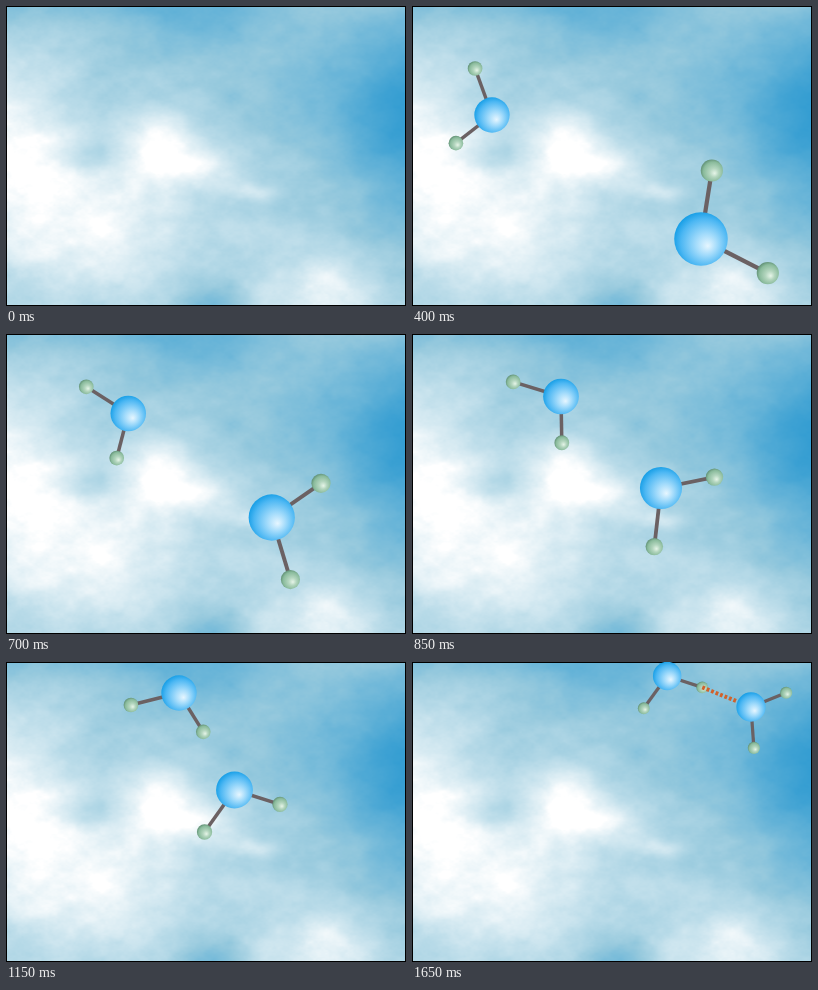
Recreate the animation shown at these times as an HTML page with a canvas. Size 400 by 300 pixels, loop 1800 ms.

```html
<!DOCTYPE html>
<html lang="en">
<head>
<meta charset="utf-8">
<title>Water molecules in the sky</title>
<style>
  html, body { margin: 0; width: 100%; height: 100%; overflow: hidden; background: #000; }
  canvas { display: block; }
</style>
</head>
<body>
<canvas id="stage" width="400" height="300"></canvas>
<script>
const W = 400, H = 300, LOOP = 1800;
const ctx = document.getElementById('stage').getContext('2d');

const mix = (a, b, t) => a + (b - a) * t;
const mixAll = (a, b, t) => a.map((v, i) => mix(v, b[i], t));
const ease = t => t * t * (3 - 2 * t);

// ---- sky ----

const DEEP = [36, 150, 208], HAZE = [150, 201, 221], WHITE = [255, 255, 255];

// Soft clouds and gaps: x, y, x radius, y radius, strength
const PUFFS = [
  [410, 110, 75, 110, -0.5], [190, -15, 90, 60, -0.32], [0, -10, 120, 35, -0.15],
  [300, 90, 80, 60, -0.12], [200, 300, 35, 25, -0.26], [85, 147, 32, 13, -0.14],
  [0, 130, 70, 70, 0.38], [80, 220, 110, 70, 0.36], [150, 142, 42, 36, 0.38],
  [200, 160, 38, 18, 0.22], [250, 186, 22, 9, 0.2], [315, 290, 60, 50, 0.33]
];

function hash(x, y, seed) {
  let h = Math.imul(x, 374761393) + Math.imul(y, 668265263) + Math.imul(seed, 974634541);
  h = Math.imul(h ^ (h >>> 13), 1274126177);
  return ((h ^ (h >>> 16)) >>> 0) / 2147483648 - 1;
}

function noise(x, y, seed) {
  const i = Math.floor(x), j = Math.floor(y), u = ease(x - i), v = ease(y - j);
  return mix(
    mix(hash(i, j, seed), hash(i + 1, j, seed), u),
    mix(hash(i, j + 1, seed), hash(i + 1, j + 1, seed), u), v);
}

function fractal(x, y) {
  let sum = 0;
  for (let k = 0; k < 5; k++) {
    const cell = 32 / 2 ** k;
    sum += 0.6 ** k * noise(x / cell, y / (cell * 0.7), k);
  }
  return sum;
}

function density(x, y) {
  let v = 0.58;
  for (const [px, py, rx, ry, s] of PUFFS) {
    v += s * Math.exp(-(((x - px) / rx) ** 2) - ((y - py) / ry) ** 2);
  }
  v += fractal(x, y) * mix(0.02, 0.065, v);
  return Math.max(0, Math.min(1, v));
}

function skyColor(v) {
  return v < 0.5 ? mixAll(DEEP, HAZE, v * 2) : mixAll(HAZE, WHITE, v * 2 - 1);
}

function makeSky() {
  const sky = document.createElement('canvas');
  sky.width = W;
  sky.height = H;
  const g = sky.getContext('2d'), img = g.createImageData(W, H);
  for (let y = 0; y < H; y++) {
    for (let x = 0; x < W; x++) {
      img.data.set([...skyColor(density(x, y)), 255], (y * W + x) * 4);
    }
  }
  g.putImageData(img, 0, 0);
  g.strokeStyle = '#000';
  g.strokeRect(0.5, 0.5, W - 1, H - 1);
  return sky;
}

// ---- molecules ----

// The picture moves on only at these times.
const STEPS = [250, 400, 550, 700, 850, 1000, 1150, 1250, 1350, 1500, 1650];
const DOCKED = 1150, BOND_FROM = 1250, LOWER_FROM = 400;

// Key poses: time, x, y, arm length, arm angle in degrees
const UPPER = [
  [250, 52.5, 124.5, 49.5, -82], [400, 80, 109, 49.5, -110],
  [550, 95.5, 96.5, 49.5, -132], [850, 149, 62.5, 50, -163],
  [1150, 173, 31, 49.5, -194]
];
const LOWER = [
  [400, 289, 233, 75, 27], [550, 282.5, 213, 70.6, 50],
  [850, 249, 154, 59, 96.5], [1150, 228.5, 128, 51.6, 125.5],
  [1350, 254.5, 105.5, 47.7, 119.5], [1500, 314, 74.5, 44, 103],
  [1650, 339, 45, 41, 86]
];

const BLUE = ['#e6f6ff', '#a2dbfb', '#4cb7f3', '#169ee6'];
const GREEN = ['#e6f5e8', '#b4d6bf', '#8abb9c', '#5f8f74'];

function poseAt(keys, t) {
  const n = Math.max(1, keys.findIndex(k => k[0] >= t));
  const a = keys[n - 1], b = keys[n];
  return mixAll(a, b, (t - a[0]) / (b[0] - a[0])).slice(1);
}

function polar(x, y, len, deg) {
  const a = deg * Math.PI / 180;
  return [x + Math.cos(a) * len, y + Math.sin(a) * len];
}

// Once docked, the upper molecule turns and shrinks rigidly with the lower one.
function partner([x, y, len, deg]) {
  return [...polar(x, y, len * 2.18, deg - 245.7), len * 0.972, deg - 320];
}

const longArm = ([x, y, len, deg]) => polar(x, y, len, deg);
const shortArm = ([x, y, len, deg]) => polar(x, y, len * 0.925, deg - 108);

function ball(x, y, r, colors) {
  const g = ctx.createRadialGradient(x + r * 0.26, y + r * 0.26, 0, x + r * 0.1, y + r * 0.1, r * 1.14);
  colors.forEach((c, i) => g.addColorStop([0, 0.35, 0.78, 1][i], c));
  ctx.fillStyle = g;
  ctx.beginPath();
  ctx.arc(x, y, r, 0, Math.PI * 2);
  ctx.fill();
}

function line(x1, y1, x2, y2, width, color, dash = []) {
  ctx.setLineDash(dash);
  ctx.lineWidth = width;
  ctx.strokeStyle = color;
  ctx.beginPath();
  ctx.moveTo(x1, y1);
  ctx.lineTo(x2, y2);
  ctx.stroke();
}

function molecule(pose, color) {
  const [x, y, len] = pose;
  for (const [hx, hy] of [longArm(pose), shortArm(pose)]) {
    line(x, y, hx, hy, 2 + len * 0.03, color);
    ball(hx, hy, len * 0.148, GREEN);
  }
  ball(x, y, len * 0.357, BLUE);
}

function hydrogenBond(from, to) {
  const [x1, y1] = shortArm(from), [x2, y2, len] = to;
  const t = 1 - len * 0.35 / Math.hypot(x2 - x1, y2 - y1);
  line(x1, y1, mix(x1, x2, t), mix(y1, y2, t), 4, '#d0622c', [2.8, 2]);
}

// ---- playback ----

const sky = makeSky();
const start = performance.now();

function draw(time) {
  ctx.drawImage(sky, 0, 0);
  if (time < STEPS[0]) return;
  const t = STEPS.findLast(at => at <= time);
  const lower = poseAt(LOWER, Math.max(t, LOWER_FROM));
  const upper = t > DOCKED ? partner(lower) : poseAt(UPPER, t);
  const color = t < LOWER_FROM ? '#0c0a0a' : '#6b6163';
  molecule(upper, color);
  if (t >= LOWER_FROM) molecule(lower, color);
  if (t >= BOND_FROM) hydrogenBond(upper, lower);
}

function tick() {
  draw((performance.now() - start) % LOOP);
  requestAnimationFrame(tick);
}
tick();
</script>
</body>
</html>
```
